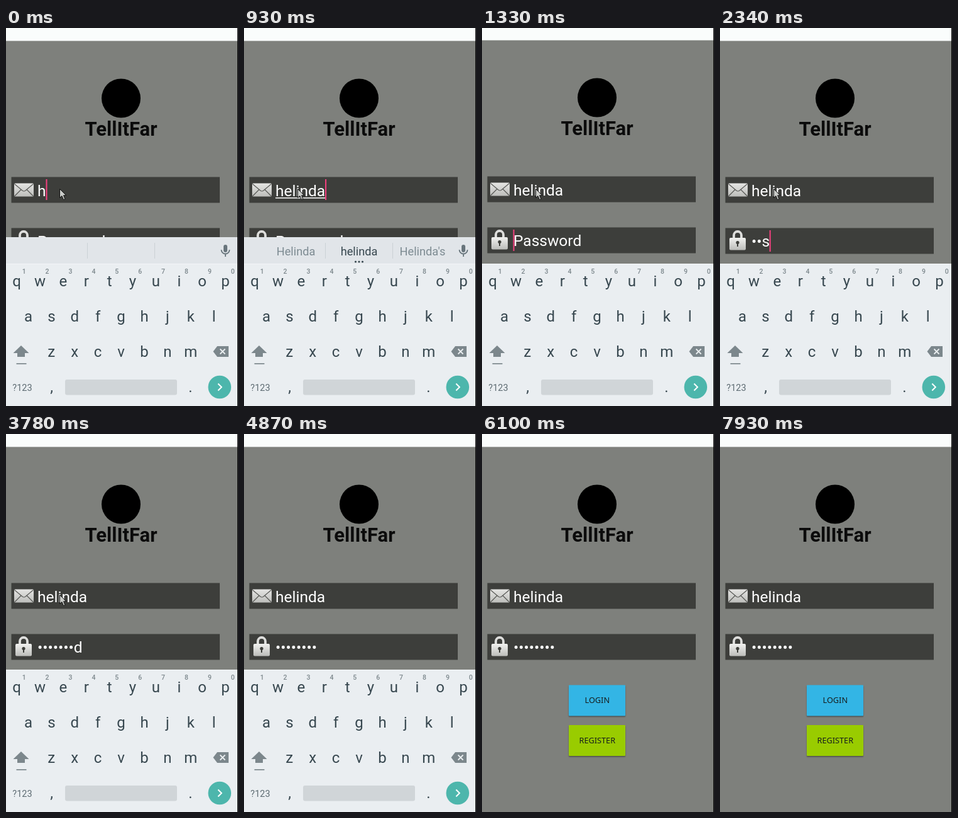
An HTML page with a canvas that plays this animation: 369x600 px, repeating every 8000 ms.

```html
<!DOCTYPE html>
<html lang="en">
<head>
<meta charset="utf-8">
<style>
  html, body { margin: 0; width: 100%; height: 100%; overflow: hidden; background: #7e807c; }
  canvas { display: block; width: 369px; height: 600px; }
</style>
</head>
<body>
<canvas id="stage" width="369" height="600"></canvas>
<script>
const ctx = document.getElementById('stage').getContext('2d');
const LOOP = 8000, USER = 'helinda', SECRET = 'password';
const FACE = 'Roboto, sans-serif', FIELD = `24.5px ${FACE}`;
const BUTTON = '12.7px "Noto Sans", sans-serif';
const KEY = '#37474f', MUTED = '#7c878c', TICK = 135;

// Step tables: [start time, value]
const USER_LENGTH = [[0, 1], [250, 2], [400, 3], [530, 4], [660, 5], [800, 6], [930, 7]];
const SECRET_LENGTH = [[0, 0], [2190, 2], [2340, 3], [2620, 4], [2890, 6], [3040, 7], [3350, 8]];
const PAN = [[0, 0], [1180, -17], [1330, -1], [1450, 0]];
const CARET = [[0, 1], [1600, 0], [2190, 1], [3780, 0], [4330, 1], [4730, 0], [5310, 1],
  [5710, 0], [6250, 1], [6710, 0], [7140, 1], [7680, 0]];

function at(steps, t) {
  let value = steps[0][1];
  for (const [start, next] of steps) if (t >= start) value = next;
  return value;
}

function rect(x, y, w, h, color) {
  ctx.fillStyle = color;
  ctx.fillRect(x, y, w, h);
}

function disc(x, y, r, color) {
  ctx.fillStyle = color;
  ctx.beginPath();
  ctx.arc(x, y, r, 0, Math.PI * 2);
  ctx.fill();
}

function pill(x, y, w, h, r, color) {
  ctx.fillStyle = color;
  ctx.beginPath();
  ctx.roundRect(x, y, w, h, r);
  ctx.fill();
}

function shape(path, fill, stroke, width = 1) {
  const p = new Path2D(path);
  if (fill) { ctx.fillStyle = fill; ctx.fill(p); }
  if (stroke) { ctx.strokeStyle = stroke; ctx.lineWidth = width; ctx.stroke(p); }
}

function label(text, x, y, font, color, align = 'center') {
  ctx.font = font;
  ctx.fillStyle = color;
  ctx.textAlign = align;
  ctx.fillText(text, x, y);
  return ctx.measureText(text).width;
}

function shade(y, h, top, bottom) {
  const g = ctx.createLinearGradient(0, y, 0, y + h);
  g.addColorStop(0, top);
  g.addColorStop(1, bottom);
  return g;
}

function envelope() {
  pill(13, 246.5, 31, 21, 1.5, shade(246, 22, '#e6e6e4', '#bcbdba'));
  shape('M13.5 247.5L26 258Q28.5 260 31 258L43.5 247.5M13.5 267L24 256.5M43.5 267L33 256.5', null, '#5a5b58', 1.2);
}

function padlock() {
  shape('M22 334V329A6 6 0 0 1 34 329V334', null, '#dededc', 3.8);
  pill(15, 333, 26, 19.5, 2, shade(333, 19, '#f1f1ef', '#bdbebb'));
  disc(28, 340.5, 2.6, '#3d3e3a');
  rect(27, 341, 2, 6, '#3d3e3a');
}

function button(text, y, color) {
  ctx.save();
  ctx.shadowColor = 'rgba(0,0,0,.4)';
  ctx.shadowBlur = 2;
  ctx.shadowOffsetY = 1.5;
  pill(138, y, 90, 49, 1, color);
  ctx.restore();
  label(text, 183.3, y + 28.5, BUTTON, '#161d1d');
}

function page(t) {
  const user = USER.slice(0, at(USER_LENGTH, t));
  const count = at(SECRET_LENGTH, t);
  const masked = t >= 4870 ? SECRET.length : Math.max(0, count - 1);
  const secret = '•'.repeat(masked) + SECRET.slice(masked, count);
  const onUser = t < 1180;

  rect(0, 0, 369, 640, '#7e807c');
  rect(0, 0, 369, 20.5, '#fafdfc');
  disc(183, 111.5, 31, '#000');
  label('TellItFar', 183, 171, `700 31px ${FACE}`, '#0b0b0b');

  rect(8.5, 236.5, 331.5, 41, '#3d3e3b');
  rect(8.5, 317.5, 331.5, 41, '#3d3e3b');
  envelope();
  padlock();
  const userWidth = label(user, 50, 266.5, FIELD, '#fff', 'left');
  if (onUser && t >= 120) rect(50, 269, userWidth, 1.5, '#fff');
  label(secret || 'Password', 50, 347, FIELD, '#fff', 'left');
  const secretWidth = secret ? ctx.measureText(secret).width : 0;
  if (at(CARET, t)) {
    if (onUser) rect(50 + userWidth, 240, 2, 33, '#f5407f');
    else rect(49.5 + secretWidth, 321, 2, 34, '#f5407f');
  }
  button('LOGIN', 398.5, '#33b5e5');
  button('REGISTER', 462, '#99cc00');
}

function suggestions(t) {
  rect(0, 332, 369, 43, '#e1e5e9');
  rect(129, 341, 1, 25, '#cbd1d5');
  rect(236, 341, 1, 25, '#cbd1d5');
  pill(346, 344, 6, 12, 3, '#68757c');
  shape('M342.5 352A6.5 6.5 0 0 0 355.5 352M349 358.5V363', null, '#68757c', 1.8);
  if (t < 120) return;
  const typed = USER.slice(0, at(USER_LENGTH, t));
  const capital = typed[0].toUpperCase() + typed.slice(1);
  const font = `18.2px ${FACE}`;
  label(capital, 82.5, 361, font, '#7d8b92');
  label(typed, 183, 361, font, KEY);
  label(capital + "'s", 284, 361, font, '#7d8b92');
  for (const x of [177.5, 183, 188.5]) disc(x, 371, 1.6, KEY);
}

function keyRow(letters, x, y) {
  [...letters].forEach((c, i) => label(c, x + i * 36.9, y, `24px ${FACE}`, KEY));
}

function keyboard() {
  rect(0, 374, 369, 226, '#eaeef1');
  rect(0, 374, 369, 1, '#f3f5f7');
  keyRow('qwertyuiop', 17, 410);
  keyRow('asdfghjkl', 35.5, 466);
  keyRow('zxcvbnm', 72.3, 522);
  [...'1234567890'].forEach((c, i) => label(c, 28.7 + i * 36.9, 390, `500 10.5px ${FACE}`, MUTED));
  shape('M24 504L36.5 516H30V522H18V516H11.5Z', MUTED);
  rect(16.5, 532, 16, 1.7, MUTED);
  shape('M329.5 513.5L336 505H354V522H336Z', MUTED);
  shape('M340.5 509.5L348.5 517.5M348.5 509.5L340.5 517.5', null, '#eaeef1', 1.8);
  label('?123', 26, 575.5, `14.5px ${FACE}`, '#5d6b72');
  label(',', 72.5, 578, `24px ${FACE}`, KEY);
  pill(94, 558, 178, 24.5, 3, '#d0d5d8');
  label('.', 293.5, 578, `24px ${FACE}`, KEY);
  disc(339.8, 570, 18.3, '#4db6ac');
  shape('M337.3 564.5L342.8 570L337.3 575.5', null, '#fff', 2);
}

function pointerPosition(t) {
  if (t < 4060) return [85, 255];
  if (t < 4870) {
    const k = (Math.floor((t - 4060) / TICK) + 1) / 6;
    return [85 + 70 * k, 255 + 299 * k * k];
  }
  if (t >= 7410 && t < 7930) {
    const k = Math.min(3, Math.floor((t - 7410) / TICK)) / 3;
    const dip = Math.sin(Math.PI * k);
    return [250 - 24 * dip, 558 - 22 * dip];
  }
  return null;
}

function pointer(t) {
  const spot = pointerPosition(t);
  if (!spot) return;
  ctx.save();
  ctx.translate(Math.round(spot[0]) + 0.5, Math.round(spot[1]) + 0.5);
  shape('M0 0V14L3.4 11L6 17L8.4 16L6 10.2H10.3Z', '#c9cbc8', '#111');
  ctx.restore();
}

function closingKeyboard() {
  ctx.save();
  ctx.translate(0, 1);
  keyboard();
  ctx.restore();
  // A trace of the page shows through.
  rect(0, 375, 369, 225, 'rgba(126,128,124,.025)');
  rect(138, 399, 90, 49, 'rgba(225,238,250,.3)');
  label('LOGIN', 183.3, 427, BUTTON, 'rgba(22,29,29,.06)');
}

function draw(t) {
  ctx.save();
  ctx.translate(0, at(PAN, t));
  page(t);
  ctx.restore();
  if (t < 1180) suggestions(t);
  if (t < 5980) keyboard();
  else if (t < 6100) closingKeyboard();
  pointer(t);
  rect(368, 0, 1, 600, '#000');
}

function frame() {
  draw(performance.now() % LOOP);
  requestAnimationFrame(frame);
}
frame();
</script>
</body>
</html>
```
